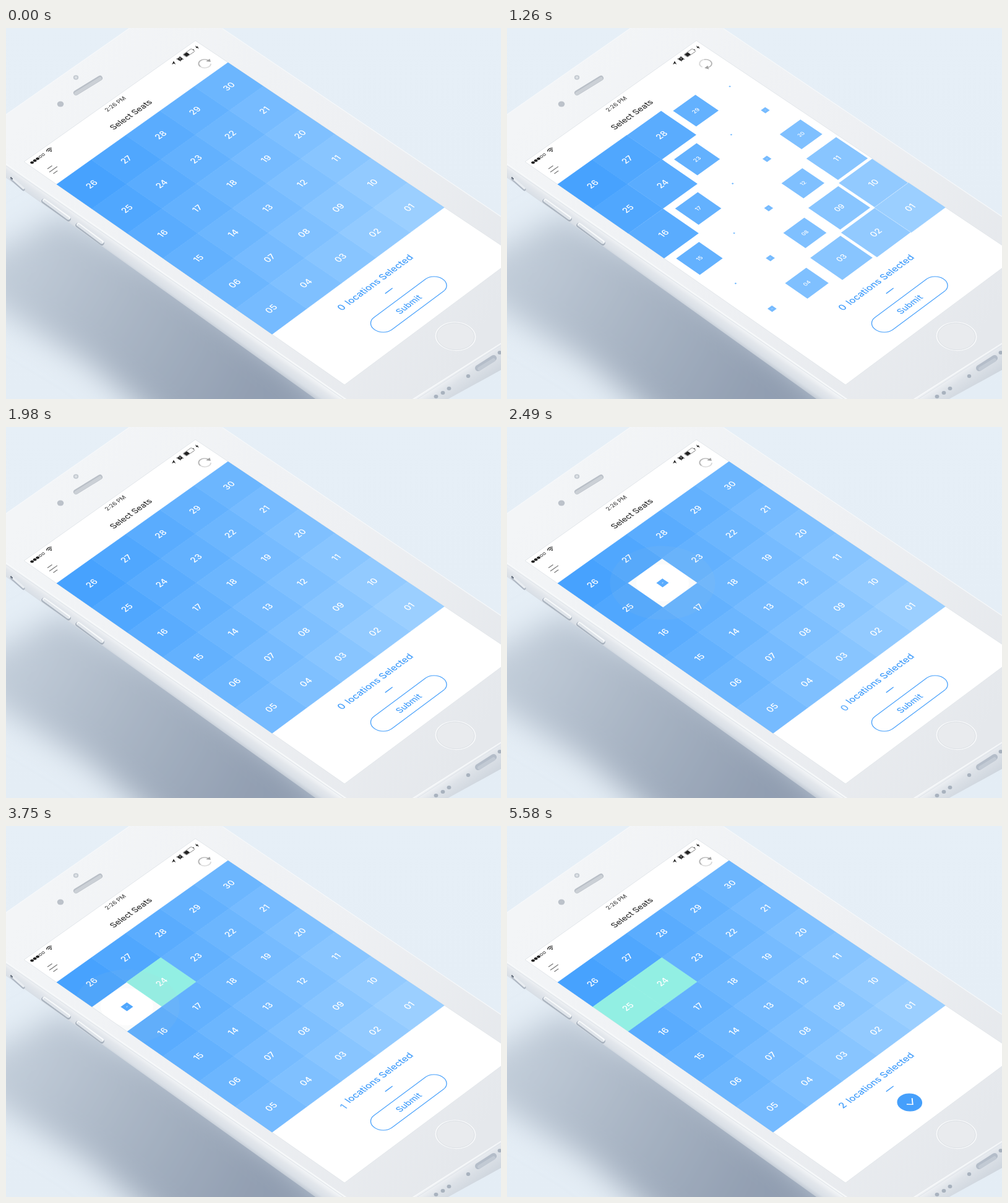
These frames come from a looping animation (800 by 600 pixels, 5940 ms). An HTML page:

```html
<!DOCTYPE html>
<html lang="en">
<head>
<meta charset="utf-8">
<title>Select Seats</title>
<style>
html, body { margin: 0; width: 100%; height: 100%; overflow: hidden; background: #e6eff7; }
svg { display: block; width: 100vw; height: 100vh; }
text { font-family: Inter, Roboto, sans-serif; }
</style>
</head>
<body>
<svg id="stage" viewBox="0 0 800 600">
  <defs>
    <linearGradient id="bg" x1="0" y1="0" x2="0" y2="1">
      <stop offset="0" stop-color="#e6eff7"/><stop offset="1" stop-color="#e4edf5"/>
    </linearGradient>
    <linearGradient id="shade" gradientUnits="userSpaceOnUse" x1="20" y1="340" x2="420" y2="570">
      <stop offset="0" stop-color="#c3ceda"/><stop offset=".45" stop-color="#abb7c6"/><stop offset="1" stop-color="#919eb1"/>
    </linearGradient>
    <linearGradient id="face" gradientUnits="userSpaceOnUse" x1="60" y1="100" x2="720" y2="560">
      <stop offset="0" stop-color="#f3f5f7"/><stop offset=".55" stop-color="#eef0f3"/><stop offset="1" stop-color="#e5e8ec"/>
    </linearGradient>
    <linearGradient id="side" gradientUnits="userSpaceOnUse" x1="240" y1="387" x2="226" y2="407">
      <stop offset="0" stop-color="#f3f5f7"/><stop offset=".35" stop-color="#e3e7ec"/><stop offset=".75" stop-color="#d9dfe6"/><stop offset="1" stop-color="#c5cdd7"/>
    </linearGradient>
    <linearGradient id="base" gradientUnits="userSpaceOnUse" x1="740" y1="546" x2="762" y2="578">
      <stop offset="0" stop-color="#f0f2f5"/><stop offset=".4" stop-color="#dde2e8"/><stop offset="1" stop-color="#cfd6de"/>
    </linearGradient>
    <filter id="soft" x="-30%" y="-30%" width="160%" height="160%"><feGaussianBlur stdDeviation="24"/></filter>
    <clipPath id="clip"><polygon id="clipShape"/></clipPath>
  </defs>

  <rect width="800" height="600" fill="url(#bg)"/>
  <polygon points="-60,385 90,300 260,390 580,640 300,680 130,540 -60,425" fill="url(#shade)" filter="url(#soft)"/>

  <g id="phone">
    <polygon points="503,602 700,608 800,553 800,480" fill="url(#base)"/>
    <polygon points="-10,208 -10,235 503,602 590,620" fill="url(#side)"/>
    <path d="M-10 147L200 0L215 -10H335L350 1L800 305V510L655 602L552 602L-10 213Z" fill="url(#face)"/>
    <path d="M-10 147L200 0M350 1L800 305" fill="none" stroke="#f6f8fa" stroke-width="1.2"/>
    <path d="M-10 213L552 602M655 602L800 510" fill="none" stroke="#f8fafb" stroke-width="1.4"/>
    <path d="M-10 216L548 602M660 603L800 513" fill="none" stroke="#dce1e7" stroke-width=".9"/>
    <g fill="none" stroke-linecap="round">
      <path d="M9 244L28 261" stroke="#aeb7c3" stroke-width="5"/>
      <path d="M10 243L28 259" stroke="#e9edf1" stroke-width="3.6"/>
      <path d="M8 242L10 244" stroke="#68717e" stroke-width="2.2"/>
      <path d="M61 280L101 309M116 319L155 348" stroke="#a9b3bf" stroke-width="7.4"/>
      <path d="M62 279L101 307M117 318L155 346" stroke="#f8fafb" stroke-width="5.8"/>
      <path d="M62 280L100 308M117 319L154 347" stroke="#dfe4ea" stroke-width="4"/>
      <path d="M113 105L152 81" stroke="#b9bfc7" stroke-width="8"/>
      <path d="M113 106L152 82" stroke="#cbd0d6" stroke-width="5.5"/>
      <path d="M763 550L788 534" stroke="#b4bdc9" stroke-width="10"/>
      <path d="M765 551L788 537" stroke="#c2cad4" stroke-width="6"/>
    </g>
    <ellipse cx="88" cy="123" rx="5.3" ry="4.6" fill="#bcc2ca"/>
    <ellipse cx="113" cy="80" rx="4.2" ry="3.7" fill="#c4cad1"/>
    <ellipse cx="113" cy="80" rx="2.2" ry="1.9" fill="#dde1e5"/>
    <g fill="#a8b2be">
      <ellipse cx="695" cy="596" rx="3.4" ry="3"/><ellipse cx="706" cy="590" rx="3.4" ry="3"/>
      <ellipse cx="716" cy="583" rx="3.4" ry="3"/><ellipse cx="747" cy="563" rx="3.2" ry="3"/>
      <ellipse cx="798" cy="525" rx="3.4" ry="3"/>
    </g>
  </g>
  <polygon id="screen" fill="#fff" stroke="#e2e6ea" stroke-width="1"/>
  <g id="app" clip-path="url(#clip)"></g>
</svg>
<script>
const LOOP = 5940, CELL = 75, BLUE = '#459ffb', MINT = [146, 239, 227];
const $ = id => document.getElementById(id);
const app = $('app');

function make(tag, attrs, parent = app, label) {
  const el = document.createElementNS('http://www.w3.org/2000/svg', tag);
  set(el, attrs);
  if (label !== undefined) el.textContent = label;
  parent.appendChild(el);
  return el;
}
function set(el, attrs) {
  for (const k in attrs) el.setAttribute(k, attrs[k]);
}

// Perspective from screen points (grid is 375 x 450 at 0,0) to the stage.
const [L, T, R, B] = [[81.8, 253], [359, 55.8], [708.5, 290], [429.8, 495.4]];
const sub = (p, q) => [p[0] - q[0], p[1] - q[1]];
const cross = (p, q) => p[0] * q[1] - p[1] * q[0];
const d1 = sub(T, R), d2 = sub(B, R), sum = sub(sub(L, T), sub(B, R));
const g = cross(sum, d2) / cross(d1, d2), h = cross(d1, sum) / cross(d1, d2);
function project(x, y) {
  const u = x / 375, v = y / 450, w = 1 + g * u + h * v;
  return [0, 1].map(i =>
    (L[i] + (T[i] - L[i] + g * T[i]) * u + (B[i] - L[i] + h * B[i]) * v) / w);
}
function place(x, y, s = 1, turn = 0) {
  const p = project(x, y), a = sub(project(x + 1, y), p), b = sub(project(x, y + 1), p);
  const m = [...a, ...b].map(n => n * s).concat(p).map(n => n.toFixed(4));
  return `matrix(${m})` + (turn ? ` rotate(${turn})` : '');
}
const box = (x0, y0, x1, y1) =>
  [[x0, y0], [x1, y0], [x1, y1], [x0, y1]].map(p => project(...p).map(n => n.toFixed(2))).join(' ');

const clamp = n => Math.min(1, Math.max(0, n));
const span = (t, from, length) => clamp((t - from) / length);
const inOut = p => p < .5 ? 4 * p ** 3 : 1 - 4 * (1 - p) ** 3;
const smooth = p => p * p * (3 - 2 * p);
// cubic-bezier(.25, .1, .25, 1)
function ease(x) {
  let lo = 0, hi = 1, s = x;
  for (let i = 0; i < 24; i++) {
    s = (lo + hi) / 2;
    if (.75 * s * (1 - s) + s ** 3 < x) lo = s; else hi = s;
  }
  return .3 * s * (1 - s) ** 2 + 3 * s * s * (1 - s) + s ** 3;
}

function label(str, x, y, size, fill, weight = 500, anchor = 'middle') {
  return make('text', {
    transform: place(x, y), y: size * .36, 'font-size': size, 'font-weight': weight,
    fill, 'text-anchor': anchor
  }, app, str);
}
const icon = (x, y, s) => make('g', { transform: place(x, y, s) });

const frame = box(0, -70, 375, 597);
$('screen').setAttribute('points', frame);
$('clipShape').setAttribute('points', frame);

// Status bar
for (let i = 0; i < 5; i++)
  make('circle', { r: i < 3 ? 2.7 : 2.2, fill: i < 3 ? '#222' : 'none', stroke: '#222', 'stroke-width': i < 3 ? 0 : .8 }, icon(7.3 + i * 6, -60));
const wifi = icon(45.5, -59, .9);
make('path', { d: 'M-6 -2.5Q0 -8 6 -2.5M-3.8 0Q0 -3.6 3.8 0', fill: 'none', stroke: '#222', 'stroke-width': 1.5 }, wifi);
make('path', { d: 'M-2 1.6Q0 0 2 1.6L0 3.8Z', fill: '#222' }, wifi);
label('2:26 PM', 187.5, -59.5, 10.5, '#333', 400);
make('path', { d: 'M4.5 -4.5L-4.5 0L0 .2L.3 4.8Z', fill: '#222' }, icon(315, -58.5, .85));
const alarm = icon(329, -58.3, .85);
make('circle', { r: 4.3, fill: '#222' }, alarm);
make('path', { d: 'M-4.8 -3L-2.8 -4.8M4.8 -3L2.8 -4.8M-3 3.5L-4 5M3 3.5L4 5', stroke: '#222', 'stroke-width': 1.4 }, alarm);
make('path', { d: 'M0 -2.4V.4H2', fill: 'none', stroke: '#fff', 'stroke-width': .9 }, alarm);
const battery = icon(348.5, -58, .88);
make('rect', { x: -11, y: -4.5, width: 21, height: 9, rx: 1.5, fill: '#fff', stroke: '#555', 'stroke-width': .8 }, battery);
make('rect', { x: -10, y: -3.7, width: 8, height: 7.4, fill: '#222' }, battery);
make('path', { d: 'M11.2 -1.6V1.6', stroke: '#555', 'stroke-width': 1.4 }, battery);
make('path', { d: 'M1.2 -5L-2.8 .8H-.4L-1.2 5L2.8 -.9H.4Z', fill: '#222' }, icon(366, -57.8, .9));

// Navigation bar
label('Select Seats', 187.5, -26, 14.4, '#333');
for (const [x0, x1, y] of [[14, 24, -33.5], [11, 28, -26.5], [13, 22, -20]])
  make('path', { d: `M${x0 - 19} 0H${x1 - 19}`, stroke: '#777', 'stroke-width': 1.4 }, icon(19, y));

// Seats
const ROWS = ['26 27 28 29 30', '25 24 23 22 21', '16 17 18 19 20', '15 14 13 12 11', '06 07 08 09 10', '05 04 03 02 01'];
const mix = (a, b, p) => a.map((n, i) => Math.round(n + (b[i] - n) * p));
const rgb = c => `rgb(${c})`;
const TAPS = { 24: 2100, 25: 3360 };
const seats = ROWS.flatMap((row, r) => row.split(' ').map((name, c) => ({
  x: (c + .5) * CELL, y: (r + .5) * CELL, lag: 70 * (9 - c - r), tap: TAPS[name],
  color: rgb(mix([71, 162, 254], [155, 207, 255], (c + r) / 9)),
  tile: make('polygon', { 'stroke-width': .7 }),
  text: make('text', { 'font-size': 15, 'font-weight': 500, y: 5.4, fill: '#fff', 'text-anchor': 'middle' }, app, name)
})));

const ripple = make('path', { fill: '#bcbfc2', 'fill-rule': 'evenodd' });

const loader = make('g', {});
make('path', { d: 'M6.4 6.8A9.3 9.3 0 0 1 -9.3 0', fill: 'none', stroke: '#d9d9d9', 'stroke-width': 1.9 }, loader);
make('path', { d: 'M-9.3 0A9.3 9.3 0 0 1 9.2 -1.4', fill: 'none', stroke: '#b4b4b4', 'stroke-width': 1.9 }, loader);
make('path', { d: 'M5 -2H13.4L9.2 4Z', fill: '#a2a2a2' }, loader);

// Footer
const TEXT_Y = 484.5, BUTTON_Y = 551, RADIUS = 18;
const digits = [0, 1, 2].map(n => label(n, 113, TEXT_Y, 16, BLUE));
label('locations Selected', 264.5, TEXT_Y, 16, BLUE, 500, 'end');
make('path', { d: 'M-8 0H8', stroke: BLUE, 'stroke-width': 1.5 }, icon(187.5, 511));
const button = icon(187.5, BUTTON_Y);
const pill = make('rect', { y: -RADIUS, height: 2 * RADIUS, rx: RADIUS, fill: BLUE, stroke: BLUE, 'stroke-width': 1.2 }, button);
const submit = label('Submit', 187.5, BUTTON_Y, 14.6, BLUE);
const check = make('path', {
  d: 'M-6 -.5L0 6.2L9 -3.5', fill: 'none', stroke: '#fff', 'stroke-width': 1.7,
  pathLength: 1, 'stroke-dasharray': '1 2'
}, button);

// Home button
const home = make('g', { transform: place(187.5, 645) }, $('stage'));
make('circle', { r: 29, fill: '#e9ebee', stroke: '#f9fafb', 'stroke-width': 1.6 }, home);
make('circle', { r: 27.8, fill: 'none', stroke: '#d9dee3', 'stroke-width': .8 }, home);

function pulse(t, start) {
  const out = 1 - inOut(span(t, start, 195));
  return Math.max(out, ease(span(t, start + 190, 300)));
}

function drawSeat(seat, t) {
  const tapped = seat.tap !== undefined && t > seat.tap;
  const start = tapped ? seat.tap + 265 : 755 + seat.lag;
  const s = pulse(t, start), half = CELL / 2 * s;
  const fill = tapped && t > start + 193 ? rgb(MINT) : seat.color;
  set(seat.tile, {
    points: box(seat.x - half, seat.y - half, seat.x + half, seat.y + half),
    fill, stroke: s > .999 ? fill : 'none'
  });
  set(seat.text, { transform: place(seat.x, seat.y, Math.max(s, .001)) });
}

const touches = [[330, 348, -24], [2100, 112.5, 112.5], [3360, 37.5, 112.5], [4440, 187.5, BUTTON_Y]];
const circle = r => `M${-r} 0A${r} ${r} 0 1 1 ${r} 0A${r} ${r} 0 1 1 ${-r} 0Z`;
function drawRipple(t) {
  const touch = touches.find(([at]) => t > at && t < at + 450);
  if (!touch) return set(ripple, { opacity: 0 });
  const [at, x, y] = touch, age = t - at;
  const outer = 20 * smooth(span(age, 0, 120)) + 60 * inOut(span(age, 150, 270));
  const inner = 44 * span(age, 110, 310);
  set(ripple, {
    d: circle(outer) + circle(inner), transform: place(x, y),
    opacity: .85 * (1 - span(age, 180, 230))
  });
}

function drawDigits(t) {
  const outs = [2100, 3360, Infinity];
  digits.forEach((el, i) => {
    const q = span(t, outs[i] + 280, 210);
    const p = i ? ease(span(t, outs[i - 1] + 490, 290)) : 1;
    set(el, {
      transform: place(113, TEXT_Y + 8 * smooth(q) - 8 * (1 - p)),
      opacity: p * (1 - q ** 3)
    });
  });
}

function drawButton(t) {
  const p = inOut(span(t, 4800, 360)), half = 74 + (RADIUS - 74) * p;
  set(pill, { x: -half, width: half * 2, 'fill-opacity': smooth(span(t, 4950, 240)) });
  set(submit, { opacity: 1 - span(t, 4760, 160) });
  const drawn = ease(span(t, 5200, 370));
  set(check, { 'stroke-dashoffset': 1 - drawn, opacity: drawn > 0 ? 1 : 0 });
}

function draw(t) {
  seats.forEach(seat => drawSeat(seat, t));
  drawRipple(t);
  const spin = (1 - Math.cos(Math.PI * span(t, 990, 1000))) / 2;
  set(loader, { transform: place(348, -24, 1, 720 * spin) });
  drawDigits(t);
  drawButton(t);
}

const begin = performance.now();
function tick() {
  draw((performance.now() - begin) % LOOP);
  requestAnimationFrame(tick);
}
tick();
</script>
</body>
</html>
```
